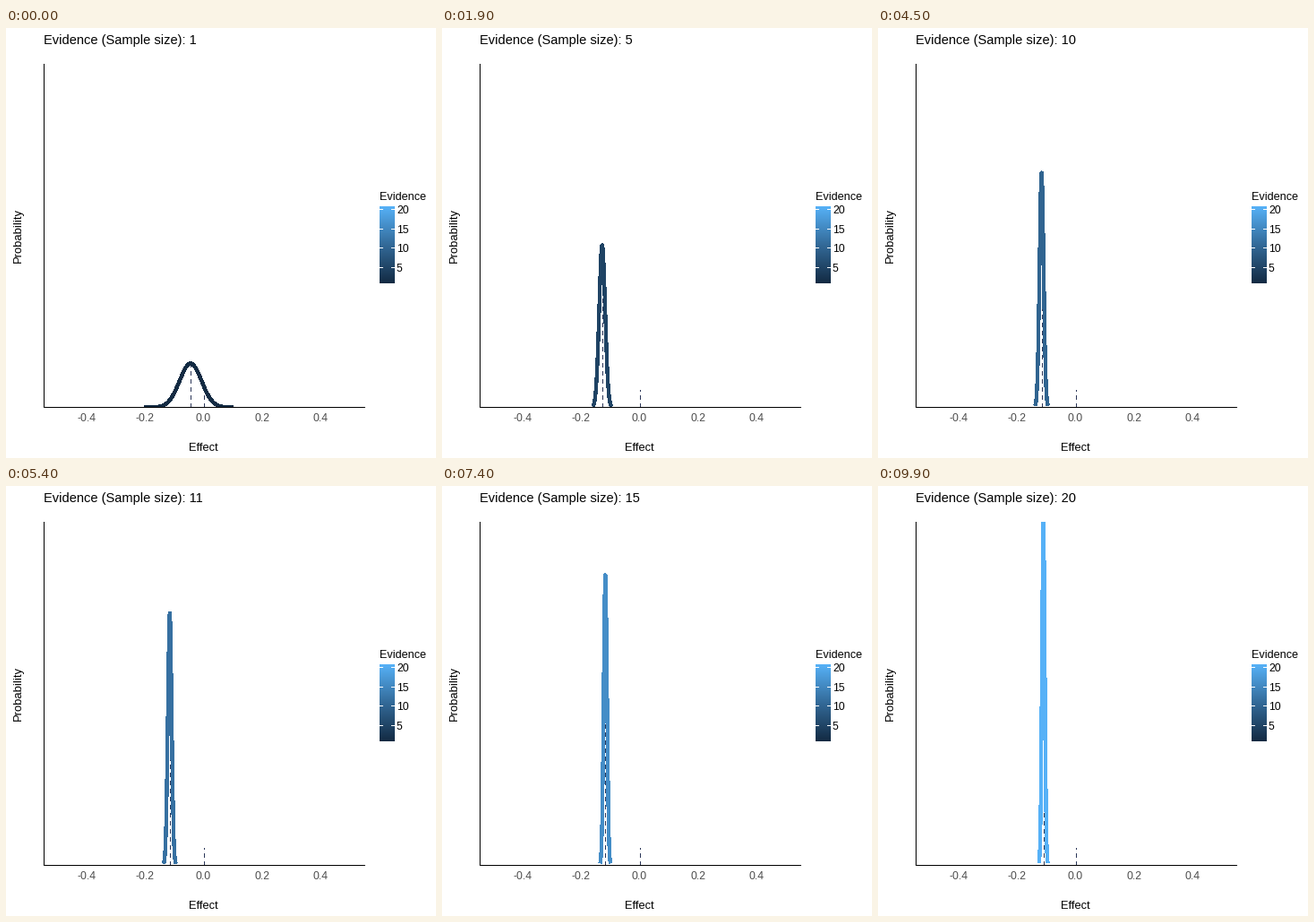
A matplotlib script for the animation above (10 s loop, 480 by 480 pixels).

```python
import numpy as np
import matplotlib.pyplot as plt
from matplotlib.animation import FuncAnimation
from matplotlib.colors import LinearSegmentedColormap
from matplotlib.patches import Rectangle

SIZE, FRAMES = 480, 100
LEFT, RIGHT, TOP, BASE = 42, 400, 40, 423
N_MIN, N_MAX = 1, 20

plt.rcParams["font.family"] = "Liberation Sans"
blues = LinearSegmentedColormap.from_list(
    "blues", ["#132B43", "#336A98", "#56B1F7"])

# Sample size, centre of the curve (px), height of the peak (px)
SIZES = [1, 2, 3, 4.65, 7.33, 9.64, 13.09, 17.5, 20]
CENTRES = [206, 167.6, 174.3, 178.8, 179.2, 182.6, 183, 181.6, 184.6]
HEIGHTS = [49, 107, 144, 181, 227, 262, 301, 349, 382.5]
AREA = 600

fig = plt.figure(figsize=(SIZE / 72, SIZE / 72), dpi=72, facecolor="white")
ax = fig.add_axes([0, 0, 1, 1])
ax.axis("off")


def label(x, y, text, size, color="black", ha="left", **kw):
    return ax.text(x, y, text, fontsize=size, color=color, ha=ha,
                   va=kw.pop("va", "baseline"), **kw)


def line(xs, ys, color="black", width=1, **kw):
    return ax.plot(xs, ys, color=color, lw=width, antialiased=False,
                   solid_capstyle="butt", **kw)[0]


def dashed(x, top):
    return line([x, x], [BASE, top], color="#2B3658",
                dashes=(4, 4), dash_capstyle="butt", zorder=2)


def x_px(effect):
    return (LEFT + RIGHT) / 2 + effect * (RIGHT - LEFT) / 1.1


# Axes
line([LEFT, LEFT], [TOP, BASE], zorder=4)
line([LEFT, RIGHT], [BASE, BASE], zorder=4)
for v in (-0.4, -0.2, 0.0, 0.2, 0.4):
    label(x_px(v) - .5, 439, f"{v:.1f}", 12.2, "#4D4D4D", "center")
label(220.5, 472, "Effect", 12.9, ha="center")
label(20, 231, "Probability", 13, ha="right", va="center", rotation=90)

# Colour bar
label(417, 192, "Evidence", 12.6)
ax.imshow(np.linspace(1, 0, 86)[:, None], cmap=blues, aspect="auto",
          extent=(417, 434, 285, 199), interpolation="nearest", zorder=1)
for v in (5, 10, 15, 20):
    y = round(288.3 - 4.32 * v)
    for x in (417, 430):
        line([x, x + 3], [y, y], color="white", zorder=2)
    label(436, y + 5, str(v), 12.3)
ax.set_xlim(0, SIZE)
ax.set_ylim(SIZE, 0)

# Moving parts
title = label(42, 18, "", 14.6)
dashed(x_px(0), BASE - 19)
mean = dashed(0, BASE)
curve = line([], [], width=3.3, solid_joinstyle="round", zorder=3)
curve.set_clip_path(Rectangle((LEFT, TOP), RIGHT - LEFT, BASE + 1 - TOP,
                              transform=ax.transData))


def draw(i):
    n = N_MIN + (N_MAX - N_MIN) * i / (FRAMES - 1)
    centre = np.interp(n, SIZES, CENTRES)
    height = np.interp(n, SIZES, HEIGHTS)
    lo = np.interp(n, [1, 2, 4.65], [-4.2, -3.4, -3.1])
    hi = np.interp(n, [1, 2, 4.65], [3.85, 3.4, 3.1])
    z = np.linspace(lo, hi, 161)
    curve.set_data(centre + z * AREA / height,
                   BASE + .5 - height * np.exp(-z * z / 2))
    curve.set_color(blues((n - N_MIN) / (N_MAX - N_MIN)))
    mid = round(centre)
    mean.set_data([mid, mid], [BASE, BASE - height])
    title.set_text(f"Evidence (Sample size): {round(n)}")
    return curve, mean, title


anim = FuncAnimation(fig, draw, frames=FRAMES, init_func=lambda: draw(0),
                     interval=100, repeat=True, repeat_delay=0)
plt.show()
```
